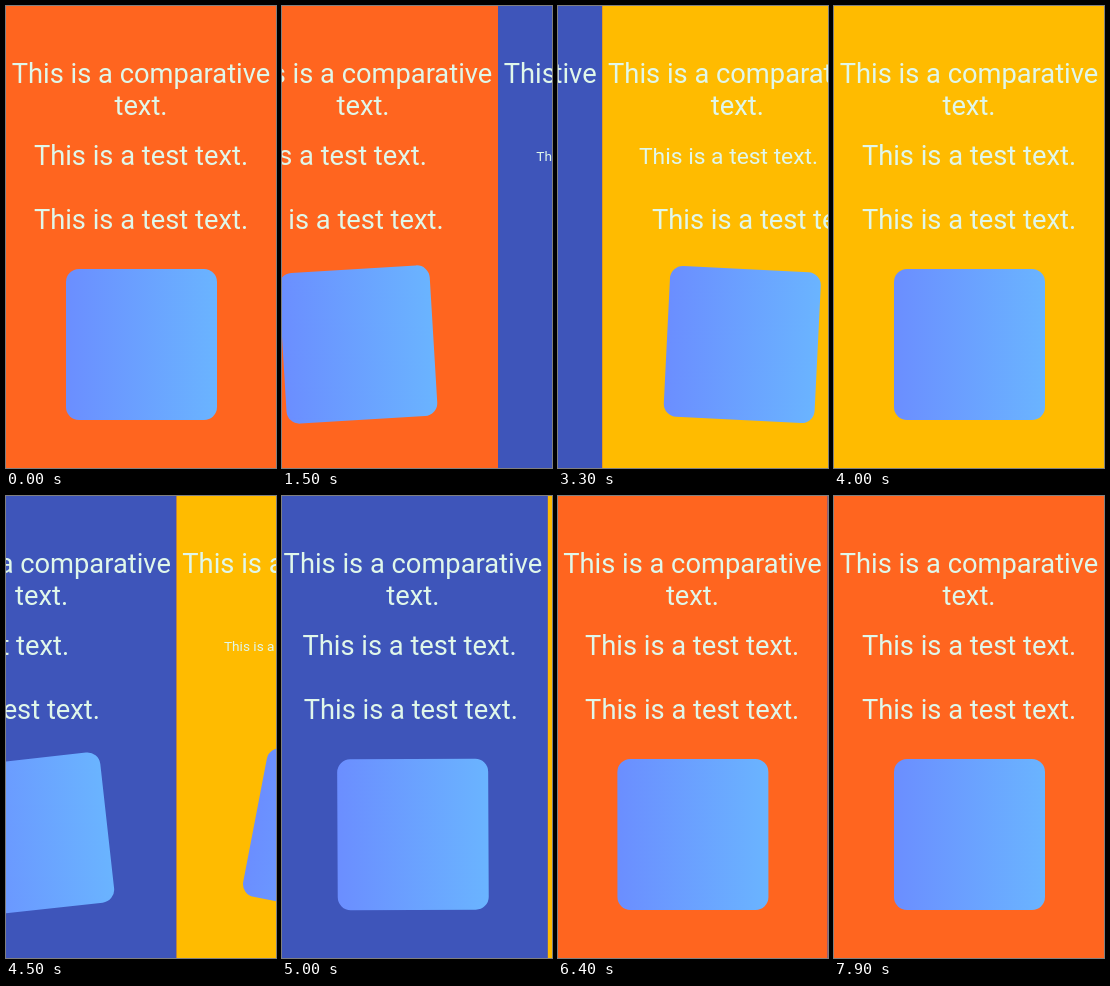
Write an HTML page that moves like this. It is 270 px wide and 462 px high and loops after 8.7 s.

```html
<!DOCTYPE html>
<html lang="en">
<head>
<meta charset="utf-8">
<title>Parallax pager</title>
<style>
  /* --p is the pager position in pages */
  @property --p {
    syntax: "<number>";
    inherits: true;
    initial-value: 0;
  }

  html, body {
    margin: 0;
    width: 100%;
    height: 100%;
    overflow: hidden;
  }

  .pager {
    position: relative;
    width: 270px;
    height: 462px;
    overflow: hidden;
    background: #ff651f;
    animation: swipe 8700ms cubic-bezier(.4, 0, .1, 1) infinite;
  }

  @keyframes swipe {
    0%, 14.517% { --p: 0; }
    27.161%, 31.475% { --p: 1; }
    44.119%, 47.103% { --p: 2; }
    59.747%, 61.787% { --p: 1; }
    74.431%, 100% { --p: 0; }
  }

  /* --o is the page's signed distance from the viewport, --d the same in pixels */
  .page {
    --o: calc(var(--i) - var(--p));
    --d: calc(var(--o) * 270px);
    position: absolute;
    inset: 0;
    overflow: hidden;
    background: var(--bg);
    transform: translateX(var(--d));
    color: #e0f7ea;
    font: 27.3px/32px Roboto, sans-serif;
    text-align: center;
    white-space: nowrap;
  }

  .orange { --i: 0; --bg: #ff651f; }
  .blue { --i: 1; --bg: #3e55ba; }
  .yellow { --i: 2; --bg: #ffbb00; }

  .page > * {
    position: absolute;
    left: 0;
    width: 270px;
    margin: 0;
  }

  .title { top: 52px; }

  .zoom {
    top: 134px;
    transform:
      translateX(calc(min(var(--d), 0px) * .8 - max(var(--d), 0px) * .2))
      scale(clamp(.5, 1 - var(--o), 1));
  }

  .slide {
    top: 198px;
    transform: translateX(calc(var(--d) * .49));
  }

  .page > .box {
    left: 59.5px;
    top: 263px;
    width: 151px;
    height: 151px;
    border-radius: 13px;
    background: linear-gradient(90deg, #6b8eff, #6ab4ff);
    transform: translateX(calc(var(--d) * .1)) rotate(calc(var(--o) * .3rad));
  }
</style>
</head>
<body>
<main class="pager">
  <section class="page orange">
    <p class="title">This is a comparative<br>text.</p>
    <p class="zoom">This is a test text.</p>
    <p class="slide">This is a test text.</p>
    <div class="box"></div>
  </section>
  <section class="page blue">
    <p class="title">This is a comparative<br>text.</p>
    <p class="zoom">This is a test text.</p>
    <p class="slide">This is a test text.</p>
    <div class="box"></div>
  </section>
  <section class="page yellow">
    <p class="title">This is a comparative<br>text.</p>
    <p class="zoom">This is a test text.</p>
    <p class="slide">This is a test text.</p>
    <div class="box"></div>
  </section>
</main>
</body>
</html>
```
